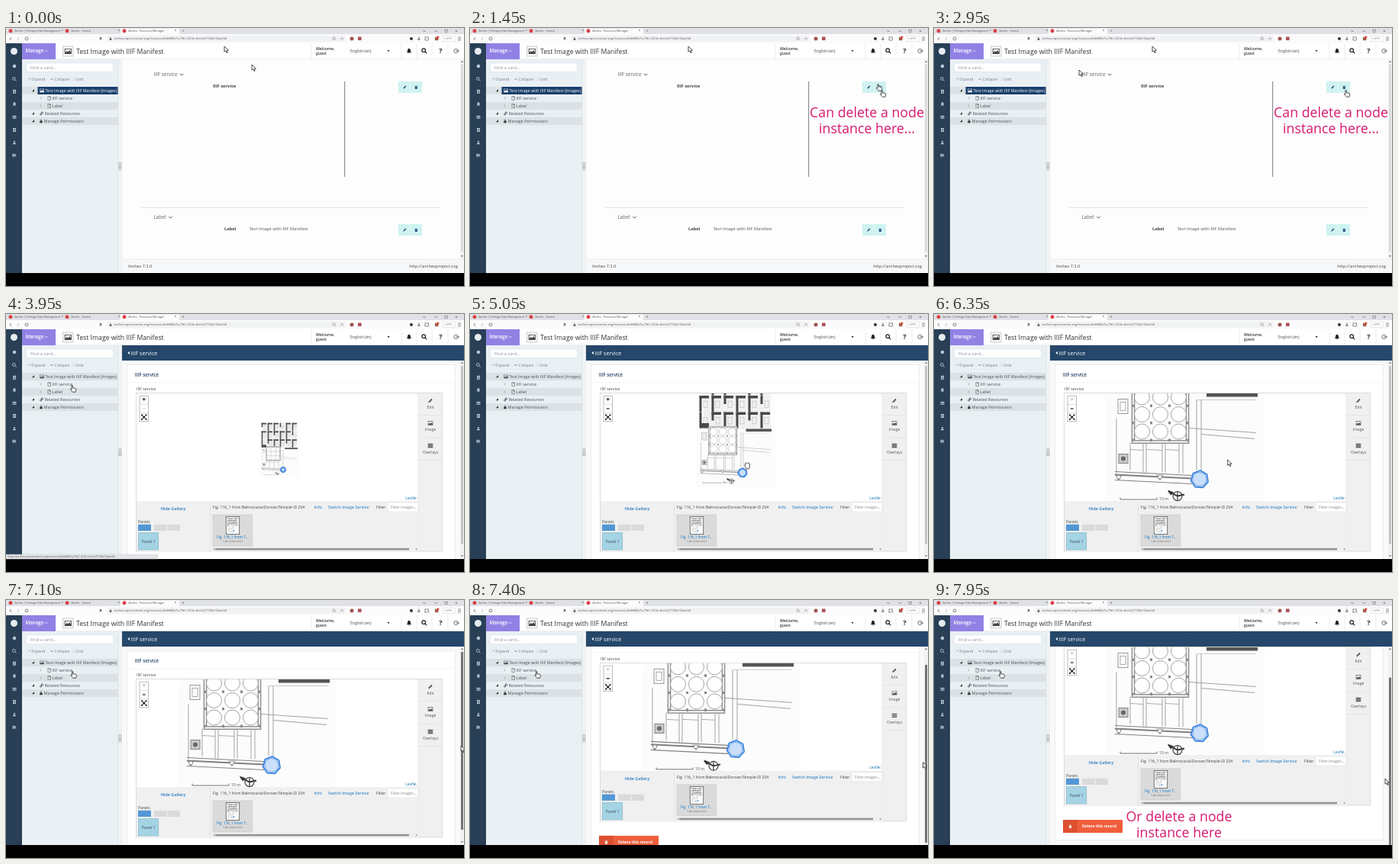
An HTML page with a canvas that plays this animation: 600x338 px, repeating every 8000 ms.

```html
<!DOCTYPE html>
<html lang="en">
<head>
<meta charset="utf-8">
<title>Resource manager walkthrough</title>
<style>
html, body { margin: 0; width: 100%; height: 100%; overflow: hidden; background: #000; }
canvas { display: block; width: 600px; height: 338px; }
</style>
</head>
<body>
<canvas id="stage"></canvas>
<script>
const W = 600, H = 338, LOOP = 8000;
const canvas = document.getElementById('stage');
const ctx = canvas.getContext('2d');
const dpr = window.devicePixelRatio || 1;
canvas.width = W * dpr;
canvas.height = H * dpr;

const INK = '#4a525a', NAVY = '#25476a', BLUE = '#3f8aca', PINK = '#d81b70';
const URL_TEXT = 'arches.opencontext.org/resource/bdd86b7a-7fb1-413e-becf-b7158a154ae3#';
const PAGE_SWAP = 3550;

// Cursor, scroll and zoom as [time, ...values] keys
const CURSOR = [[0, 322, 48], [150, 322, 48], [850, 524, 76], [1250, 540, 81], [1420, 534, 73],
  [2350, 534, 73], [2900, 192, 56], [2950, 190, 55], [3300, 86, 93], [4300, 86, 93], [4700, 361, 199],
  [5300, 364, 191], [6250, 364, 191], [6800, 596, 191], [7200, 596, 191], [7600, 591, 234], [8000, 591, 234]];
const SCROLL = [[0, 0], [7200, 0], [7600, 42], [8000, 42]];
const ZOOM = [[0, 0], [4750, 0], [5000, 1], [5585, 1], [5835, 2], [8000, 2]];
const MARKER = [[0, 363, 204], [1, 357, 208], [1.72, 350, 213.3], [2, 348, 216.5]];

const ease = u => u * u * (3 - 2 * u);
const linear = u => u;

function track(keys, t, shape = ease) {
  let i = 1;
  while (i < keys.length - 1 && t > keys[i][0]) i++;
  const a = keys[i - 1], b = keys[i];
  const u = shape(Math.min(1, Math.max(0, (t - a[0]) / (b[0] - a[0]))));
  return a.slice(1).map((v, j) => v + (b[j + 1] - v) * u);
}

function box(x, y, w, h, fill, stroke, lw = 0.6) {
  if (fill) { ctx.fillStyle = fill; ctx.fillRect(x, y, w, h); }
  if (stroke) { ctx.strokeStyle = stroke; ctx.lineWidth = lw; ctx.strokeRect(x, y, w, h); }
}

function line(color, lw, ...p) {
  ctx.strokeStyle = color;
  ctx.lineWidth = lw;
  ctx.beginPath();
  for (let i = 0; i < p.length; i += 2) ctx.lineTo(p[i], p[i + 1]);
  ctx.stroke();
}

function disc(x, y, r, fill, stroke, lw = 0.8) {
  ctx.beginPath();
  ctx.arc(x, y, r, 0, 7);
  if (fill) { ctx.fillStyle = fill; ctx.fill(); }
  if (stroke) { ctx.strokeStyle = stroke; ctx.lineWidth = lw; ctx.stroke(); }
}

// y is the vertical middle of the lowercase letters
function text(s, x, y, size, color = INK, weight = 400, align = 'left') {
  ctx.font = `${weight} ${size}px "Open Sans", "Noto Sans", sans-serif`;
  ctx.textAlign = align;
  ctx.fillStyle = color;
  ctx.fillText(s, x, y + size * 0.34);
}

// Icons live in a 10 by 10 box
const ICONS = {
  pencil: 'M1 9L1.6 6.4 7 1 9 3 3.6 8.4Z',
  trash: 'M1 2H3.5V1H6.5V2H9V3.2H1ZM2 4H8L7.5 10H2.5Z',
  bell: 'M1 8Q2.4 6.5 2.4 4 2.4 1 5 .8 7.6 1 7.6 4 7.6 6.5 9 8ZM4 8.6H6L5 10Z',
  image: 'M0 1H10V9H0ZM1 2V7L3.5 4.5 5 6 7 3.5 9 6V2Z',
  file: 'M2 .5H6L8.5 3V9.5H2ZM2.8 1.3V8.7H7.7V3.6H5.5V1.3Z',
  lock: 'M1.5 4.5H3V3Q3 .5 5 .5 7 .5 7 3V4.5H8.5V9.5H1.5ZM4 4.5H6V3Q6 1.6 5 1.6 4 1.6 4 3Z',
  flag: 'M2 0H8V10L5 7 2 10Z',
  user: 'M3 2.5Q3 .5 5 .5 7 .5 7 2.5 7 5 5 5 3 5 3 2.5ZM.8 9.5Q1 6 3.5 5.5H6.5Q9 6 9.2 9.5Z',
  rows: 'M0 1H10V3H0ZM0 4H10V6H0ZM0 7H10V9H0Z',
  page: 'M1 0H9V10H1ZM2.5 2V3H7.5V2ZM2.5 4.5V5.5H7.5V4.5ZM2.5 7V8H7.5V7Z',
  books: 'M0 1H2.5V9H0ZM3.2 1H5.7V9H3.2ZM6 2L8 1.4 10 8.4 8 9Z',
  arrow: 'M0 0V8.2L2 6.5 3.5 9.8 4.9 9.2 3.5 6H6.2Z',
  hand: 'M2.2 .8Q3.2 0 3.8 1V4.2L8 5Q9 5.3 8.8 6.8L8 10.5H3.8L.8 7Q.2 6 1.2 5.8L2.4 6.6Z',
  grab: 'M1 5Q1 4 2 4.2V2Q2.8 .8 3.8 1.6 4.4 .5 5.4 1.4 6.4 .8 7 2 8.4 1.6 8.6 3V6.6L7.4 10H3.4Z'
};
for (const k in ICONS) ICONS[k] = new Path2D(ICONS[k]);

function icon(name, cx, cy, size, color) {
  ctx.save();
  ctx.translate(cx - size / 2, cy - size / 2);
  ctx.scale(size / 10, size / 10);
  ctx.fillStyle = color;
  ctx.fill(ICONS[name], 'evenodd');
  ctx.restore();
}

function pointer(name, x, y) {
  ctx.save();
  ctx.translate(x, y);
  ctx.scale(0.88, 0.88);
  ctx.fillStyle = '#fff';
  ctx.fill(ICONS[name]);
  ctx.strokeStyle = '#222';
  ctx.lineWidth = 0.9;
  ctx.stroke(ICONS[name]);
  ctx.restore();
}

function lens(x, y, r, color, lw) {
  disc(x - r * 0.25, y - r * 0.25, r * 0.7, null, color, lw);
  line(color, lw, x + r * 0.25, y + r * 0.25, x + r, y + r);
}

function chevron(x, y) {
  line('#555', 1, x - 2.2, y - 1.1, x, y + 1.2, x + 2.2, y - 1.1);
}

function triangle(color, ...p) {
  ctx.fillStyle = color;
  ctx.beginPath();
  for (let i = 0; i < 6; i += 2) ctx.lineTo(p[i], p[i + 1]);
  ctx.fill();
}

function browser() {
  box(0, 0, W, 8, '#dfe1e5');
  box(150, 0.6, 77, 8, '#fbfbfb');
  const tabs = [[6, 'Arches | Heritage Data Management', 3.5], [80, 'Arches - Search', 3.6], [155, 'Arches - Resource Manager', 3.7]];
  for (const [x, s, size] of tabs) {
    disc(x, 3.8, 2.5, '#d9454b');
    text(s, x + 5.5, 3.8, size, '#555');
  }
  for (const x of [74, 148, 222]) text('×', x, 3.8, 4.5, '#555', 400, 'center');
  text('+', 232, 3.8, 5.5, '#444', 400, 'center');
  line('#555', 0.6, 546, 3, 548, 5, 550, 3);
  line('#555', 0.6, 561, 4, 565, 4);
  box(575, 2.3, 3.4, 3.4, null, '#555', 0.5);
  text('×', 590, 3.8, 6, '#444', 400, 'center');

  box(0, 8, W, 12, '#fbfbfb');
  box(133, 9.8, 311, 8.4, '#f1f2f4');
  line('#555', 0.7, 7, 12, 5, 14, 7, 16);
  line('#aaa', 0.7, 15, 12, 17, 14, 15, 16);
  disc(27, 14, 2, null, '#555', 0.7);
  icon('flag', 124, 14, 4, '#777');
  icon('lock', 137, 14, 4, '#555');
  text(URL_TEXT, 141.5, 14, 4.15, '#555');
  lens(430, 14, 2.3, '#777', 0.6);
  line('#777', 0.6, 438, 15.5, 440, 12.5, 442, 15.5);
  disc(453, 14, 2.5, '#a0554f');
  box(461, 11.5, 4.6, 4.6, '#b0525c');
  disc(531, 14, 2, '#333');
  line('#444', 0.8, 541, 11.5, 541, 16, 539.5, 14.5, 541, 16, 542.5, 14.5);
  box(549, 12, 4.5, 4, null, '#444', 0.6);
  box(562, 11.8, 4.4, 4.4, '#a55a43');
  disc(566, 12, 1.4, '#e8433a');
  box(572, 10.5, 16, 7, '#fff', '#c8cbd2', 0.4);
  text('≡ 49%', 574, 14, 3.6, '#777');
  for (const y of [12, 14, 16]) line('#555', 0.6, 592, y, 596, y);
}

function header() {
  box(0, 20, W, 21, '#fff');
  line('#d4d6d9', 0.7, 65, 41, W, 41);
  box(21, 20, 44, 21, '#9181e4');
  text('Manage', 25.5, 30.2, 6.2, '#fff', 600);
  line('#e0d8fa', 0.8, 50, 30, 55, 30);
  box(74.5, 24, 13.5, 13, '#f5f5f5', '#bbb', 0.7);
  icon('image', 81.3, 30.5, 9, '#444');
  text('Test Image with IIIF Manifest', 92, 31.1, 8.7, '#333');
  for (const x of [400, 518, 538, 558, 579]) line('#e0e0e0', 0.6, x, 20, x, 41);
  text('Welcome,', 406, 27.5, 5.2, '#333', 600);
  text('guest', 406, 33.5, 5.2, '#333', 600);
  text('English (en)', 451, 30.5, 5.15, '#444');
  triangle('#333', 499.5, 29, 502.7, 29, 501.1, 31.2);
  icon('bell', 528, 30, 7.5, '#222');
  lens(548, 30, 3.3, '#222', 1.2);
  text('?', 569.3, 30, 9, '#222', 700, 'center');
  disc(589.5, 30, 2.7, null, '#555', 0.8);
  line('#555', 0.8, 589, 30, 594, 30);
}

function sidebar() {
  box(0, 20, 21, 301, '#283f55');
  disc(10.5, 30.5, 4.5, '#e6ebf0');
  const light = '#b9c6d2';
  disc(11, 50, 2.3, light);
  lens(11, 67, 2.7, light, 0.9);
  ['page', 'flag', 'rows', 'page', 'user', 'books'].forEach((n, i) => icon(n, 11, 83.3 + i * 16.7, 5, light));
}

function treePanel(selected) {
  box(21, 41, 126, 280, '#e9f0f4');
  box(147, 41, 5, 280, '#f1f3f4');
  line('#d3d7db', 0.5, 147, 41, 147, 321);
  line('#d3d7db', 0.5, 152, 41, 152, 321);
  for (let i = 0; i < 4; i++) {
    disc(148.2, 177 + i * 2.7, 0.8, '#888');
    disc(150.4, 177 + i * 2.7, 0.8, '#888');
  }
  box(26.5, 46, 114, 11.5, '#fff', '#d9dfe3');
  text('Find a card...', 32, 51.7, 5.7, '#8a8f96');
  text('+ Expand', 29, 67, 5.2, '#6d8294');
  line('#6d8294', 0.8, 58, 67, 62, 67);
  text('Collapse', 63.5, 67, 5, '#6d8294');
  text('⁝', 88, 67, 5.2, '#6d8294');
  text('Grid', 91, 67, 5.2, '#6d8294');

  for (const y of [77, 97, 117]) box(21, y, 126, 10, '#dbe1e5');
  if (selected) box(41.5, 77, 105, 10, '#1a406b');
  const top = selected ? '#fff' : INK;
  for (const y of [82, 112, 122]) triangle('#222', 37, y - 1.8, 37, y + 1.3, 34, y + 1.3);
  for (const y of [92, 102]) line('#999', 0.6, 44.5, y - 1.6, 46.5, y, 44.5, y + 1.6);
  icon('image', 47, 82, 5.5, top);
  text('Test Image with IIIF Manifest (Images)', 51.5, 81.8, 5.4, top);
  icon('file', 56.5, 92, 6, '#444');
  text('IIIF service', 60.3, 92, 5.5);
  icon('file', 56.5, 102, 6, '#444');
  text('Label', 60.3, 102, 5.5);
  disc(45.7, 113, 1.1, null, '#444', 0.8);
  disc(47.4, 111, 1.1, null, '#444', 0.8);
  text('Related Resources', 50.5, 112, 5.45);
  icon('lock', 46, 122, 5, '#333');
  text('Manage Permissions', 49.5, 122, 5.45);
}

function editButtons(y) {
  box(514, y, 31, 15, '#cff2f1');
  line('#e8fafa', 0.5, 529.5, y, 529.5, y + 15);
  icon('pencil', 522.3, y + 7.5, 5.2, '#1d5277');
  icon('trash', 537.3, y + 7.5, 5.2, '#1d5277');
}

function scrollbar(top, bottom, thumbTop, thumbEnd, color) {
  box(595, top, 5, bottom - top, '#f1f1f1');
  triangle('#666', 596, top + 4, 599, top + 4, 597.5, top + 2);
  triangle('#666', 596, bottom - 5, 599, bottom - 5, 597.5, bottom - 3);
  box(596, thumbTop, 3, Math.min(thumbEnd, bottom) - thumbTop, color);
}

function report() {
  box(152, 41, 448, 262, '#fdfdfd');
  text('IIIF service', 193.5, 61, 6.4, '#666');
  chevron(230, 61);
  text('IIIF service', 301.5, 76, 5.75, '#444', 700, 'right');
  line('#777', 1, 443.7, 70, 443.7, 195);
  editButtons(70);
  line('#ddd', 0.8, 176, 235.3, 570, 235.3);
  text('Label', 193.5, 248, 6.4, '#666');
  chevron(215.5, 248);
  text('Label', 301.5, 263, 5.75, '#444', 700, 'right');
  text('Test Image with IIIF Manifest', 318.5, 263, 5.85, '#555');
  editButtons(257);
  scrollbar(41, 303, 48, 293, '#dcdcdc');
  box(152, 303, 448, 18, '#f6f7f8');
  line('#dcdfe2', 0.6, 152, 303, W, 303);
  text('Arches 7.3.0', 160, 312.5, 5.5, '#444');
  text('http://archesproject.org', 592, 312.5, 5.75, '#444', 400, 'right');
}

// Floor plan around the annotated corner; k = 1 is the closest zoom
function plan(cx, cy, k) {
  ctx.save();
  ctx.translate(cx, cy);
  ctx.scale(k, k);
  box(-123, -254, 208, 292, '#fcfcfc');
  const wall = '#484848', thin = '#999';

  box(-102, -246, 176, 132, '#f1f1f1');
  for (let r = 0; r < 3; r++) {
    const y = -245 + r * 43;
    for (let c = 0; c < 6; c++) {
      const x = -113 + c * 32;
      if ((c * 3 + r) % 7 !== 2) box(x, y, 25, 7, wall);
      box(x, y, 6, (c + r) % 3 ? 42 : 22, wall);
      box(x + 11, y + 14, 10, 17, null, '#aaa', 1);
    }
  }
  box(9, -115, 67, 7, '#555');
  box(-111, -130, 23, 13, wall);

  // Domed hall
  box(-89, -122, 75, 75, '#fdfdfd');
  box(-87, -120, 71, 71, null, '#666', 4.5);
  box(-87, -120, 71, 71, null, '#eee', 2.6);
  for (let r = 0; r < 3; r++) {
    for (let c = 0; c < 3; c++) {
      const x = -75.5 + c * 24, y = -107.5 + r * 22.5;
      disc(x, y, 10, '#fff', '#999', 0.9);
      box(x - 13.5, y + 9.7, 3, 3, '#888');
      box(x + 10.5, y + 9.7, 3, 3, '#888');
    }
  }

  box(-107, -105, 13, 19, null, thin, 1);
  box(-104, -101, 7, 11, null, thin, 0.8);
  for (const [x, y0, y1] of [[-109, -80, -8], [-91, -48, -12], [-74, -47, -9], [-70, -47, -9],
    [-49, -47, -9], [-45, -47, -9], [-27, -47, -8], [-22, -47, -8], [-4, -104, -12], [2, -104, -12]])
    line(thin, 0.9, x, y0, x, y1);
  line(thin, 0.9, -14, -67, 74, -61);
  line(thin, 0.9, 2, -59, 72, -53);
  line('#bbb', 0.8, -4, -104, 74, -104);
  for (const [x0, x1] of [[-91, -74], [-70, -49], [-45, -27]]) line(thin, 0.8, x0, -39, x1, -38);
  box(-106, -33, 12, 12, '#ccc', '#888', 1.1);
  disc(-100, -27, 3, '#666');
  for (const [y, lw] of [[-10, 1.1], [-6, 2], [1, 1.1]]) line('#808080', lw, -111, y, -10, y + 5);
  for (const x of [-106, -52]) {
    line('#777', 1, x - 4, -6, x, 1, x + 4, -6);
    disc(x, -3, 2.5, '#fff', '#888', 1);
  }

  line('#666', 0.9, -104, 24, -104, 26.5, -56, 26.5, -56, 24);
  text('10 m', -53, 25.5, 5.2, '#444');
  disc(-29, 22, 6, '#fff', '#444', 1.2);
  line('#333', 1.8, -41, 16, -29, 22, -20, 20);
  line('#333', 1.2, -29, 16, -29, 29);
  triangle('#333', -42, 14, -34, 17, -38, 21);
  ctx.restore();
}

function annotation(x, y, k) {
  ctx.beginPath();
  for (let i = 0; i < 7; i++) {
    const a = (i / 7 * 360 - 86) * Math.PI / 180;
    ctx.lineTo(x + 11.6 * k * Math.cos(a), y + 11.6 * k * Math.sin(a));
  }
  ctx.closePath();
  ctx.fillStyle = 'rgba(51,136,240,.25)';
  ctx.fill();
  ctx.strokeStyle = '#3a83dc';
  ctx.lineWidth = 1.7;
  ctx.stroke();
  disc(x, y, 9 * k, null, 'rgba(70,140,225,.7)', 1);
}

function clipped(x, y, w, h, draw) {
  ctx.save();
  ctx.beginPath();
  ctx.rect(x, y, w, h);
  ctx.clip();
  draw();
  ctx.restore();
}

function mapControls(zoom) {
  box(175, 107.3, 11.5, 33.5, '#fff', '#bbb', 1);
  line('#ccc', 0.6, 175, 118.5, 186.5, 118.5);
  line('#ccc', 0.6, 175, 129.5, 186.5, 129.5);
  text('+', 180.8, 112.7, 8, zoom === 2 ? '#bbb' : '#111', 700, 'center');
  line(zoom === 0 ? '#ccc' : '#111', 1.1, 178.8, 124, 182.8, 124);
  line('#111', 1, 178, 132.3, 183.6, 137.9);
  line('#111', 1, 183.6, 132.3, 178, 137.9);
  for (const [x, y] of [[178, 132.3], [183.6, 132.3], [178, 137.9], [183.6, 137.9]]) box(x - 0.9, y - 0.9, 1.8, 1.8, '#111');
  disc(180.8, 135.1, 1.4, '#111');
}

function gallery() {
  box(171, 245, 369, 66, '#f0f0f0');
  line('#ddd', 0.6, 267.5, 245, 267.5, 311);
  text('Hide Gallery', 219, 255, 5.35, BLUE, 700, 'center');
  text('Fig. 116_1 from Belmoravia/Dorvan/Temple ID 204', 271, 253, 5.15, '#444');
  text('Info', 403.5, 253, 5.3, BLUE, 600);
  text('Switch Image Service', 422, 253, 5.3, BLUE, 600);
  text('Filter', 485, 253, 5.3, '#444');
  box(500, 247, 40, 12, '#fff', '#ddd');
  text('Filter images...', 504, 253, 5, '#888');
  text('Panels', 173, 272, 5.1, '#444');
  box(173, 275.7, 17, 8.3, '#5297d5');
  box(194, 275.7, 16.5, 8.3, '#dadada');
  box(211.5, 275.7, 16.5, 8.3, '#dadada');
  box(173.3, 286.5, 26.5, 22.5, '#a4d4e4', '#7fb6c9');
  text('Panel 1', 186.7, 298, 5.1, '#345', 400, 'center');
  box(271, 263, 51.5, 41, '#dadada', '#c4c4c4');
  box(288.3, 265.5, 17.4, 23, '#fff', '#555', 0.8);
  clipped(289, 266, 16, 22, () => {
    plan(298.4, 284.5, 0.07);
    disc(298.4, 284, 0.9, '#3a83dc');
  });
  text('Fig. 116_1 from T...', 296.8, 292.3, 4.75, BLUE, 600, 'center');
  text('1 Annotation(s)', 296.8, 298, 3.7, '#777', 400, 'center');
  box(271, 306, 268, 4, '#eee');
  triangle('#777', 271.5, 308, 273, 306.8, 273, 309.2);
  triangle('#777', 538.5, 308, 537, 306.8, 537, 309.2);
  box(274, 306.8, 254, 2.5, '#929292');
}

function editor(t) {
  const [scroll] = track(SCROLL, t);
  const [zoom] = track(ZOOM, t);
  const [mx, my] = track(MARKER, zoom, linear);
  const k = 2 ** zoom / 4;

  box(152, 41, 448, 280, '#f9f9f9');
  clipped(152, 61, 443, 260, () => {
    ctx.translate(0, -scroll);
    box(158.5, 66.5, 430, 290, '#fff', '#dfe2e5');
    text('IIIF service', 168.7, 79.7, 6.2, NAVY, 600);
    line('#eceeef', 0.6, 159, 90, 588, 90);
    text('IIIF service', 171, 98, 5.2, '#444');
    box(170.5, 103.5, 401, 207.5, '#f0f0f0', '#c9c9c9');
    clipped(171, 104, 369, 141, () => {
      box(171, 104, 369, 141, '#fff');
      plan(mx, my, k);
      annotation(mx, my, Math.max(k, 0.28));
      mapControls(zoom);
      box(522, 237, 18, 8, 'rgba(255,255,255,.8)');
      text('Leaflet', 538, 241, 4.7, '#1878b0', 400, 'right');
    });
    line('#ddd', 0.6, 540, 104, 540, 311);
    ['pencil', 'image', 'rows'].forEach((name, i) => {
      icon(name, 556, 113.5 + i * 29.5, 6.6, '#555');
      text(['Edit', 'Image', 'Overlays'][i], 556, 122 + i * 29.6, 5, '#555', 400, 'center');
      line('#ddd', 0.6, 540, 132.5 + i * 29.5, 571, 132.5 + i * 29.5);
    });
    gallery();
    box(169, 330, 78, 17, '#ef5e3c');
    box(169, 330, 19, 17, '#dd5030');
    icon('trash', 178.5, 338.5, 5, '#fff');
    text('Delete this record', 194, 338.5, 5.05, '#fff', 700);
  });
  box(152, 41, 448, 20, NAVY);
  triangle('#fff', 159.5, 51, 161.8, 48.8, 161.8, 53.2);
  text('IIIF service', 163.5, 51.2, 7.2, '#fff');
  const top = 68 + scroll * 0.8;
  scrollbar(61, 321, top, top + 233, t > 6750 ? '#747474' : '#c4c4c4');
  if (t < 4400) {
    box(0, 315, 199, 6, '#e3e5e8', '#c5c8cc', 0.4);
    text('https://' + URL_TEXT, 2, 318, 3.6, '#555');
  }
}

function caption(x, y, first, second) {
  text(first, x, y, 17.8, PINK, 400, 'center');
  text(second, x, y + 21, 17.8, PINK, 400, 'center');
}

function cursorShape(t) {
  if ((t > 850 && t < 2400) || (t > 3250 && t < 4350)) return 'hand';
  return t > 4600 && t < 6350 ? 'grab' : 'arrow';
}

function draw(t) {
  ctx.setTransform(dpr, 0, 0, dpr, 0, 0);
  box(0, 0, W, H, '#000');
  browser();
  header();
  sidebar();
  const before = t < PAGE_SWAP;
  treePanel(before);
  if (before) report(); else editor(t);

  if (t > 1150 && t < 3400) caption(520, 111, 'Can delete a node', 'instance here...');
  if (t > 7680) caption(321, 284, 'Or delete a node', 'instance here');

  // Pointers that linger after the real one has moved on
  if (before) pointer('arrow', 286, 24);
  if (t > 1300 && before) pointer('hand', 537, 81);
  if (t > 6400) pointer('hand', 84.5, 93);

  const [x, y] = track(CURSOR, t);
  const shape = cursorShape(t);
  pointer(shape, shape === 'hand' ? x - 2 : x - (shape === 'grab' ? 4 : 0), y);
}

const start = performance.now();
function tick() {
  draw((performance.now() - start) % LOOP);
  requestAnimationFrame(tick);
}
tick();
</script>
</body>
</html>
```
